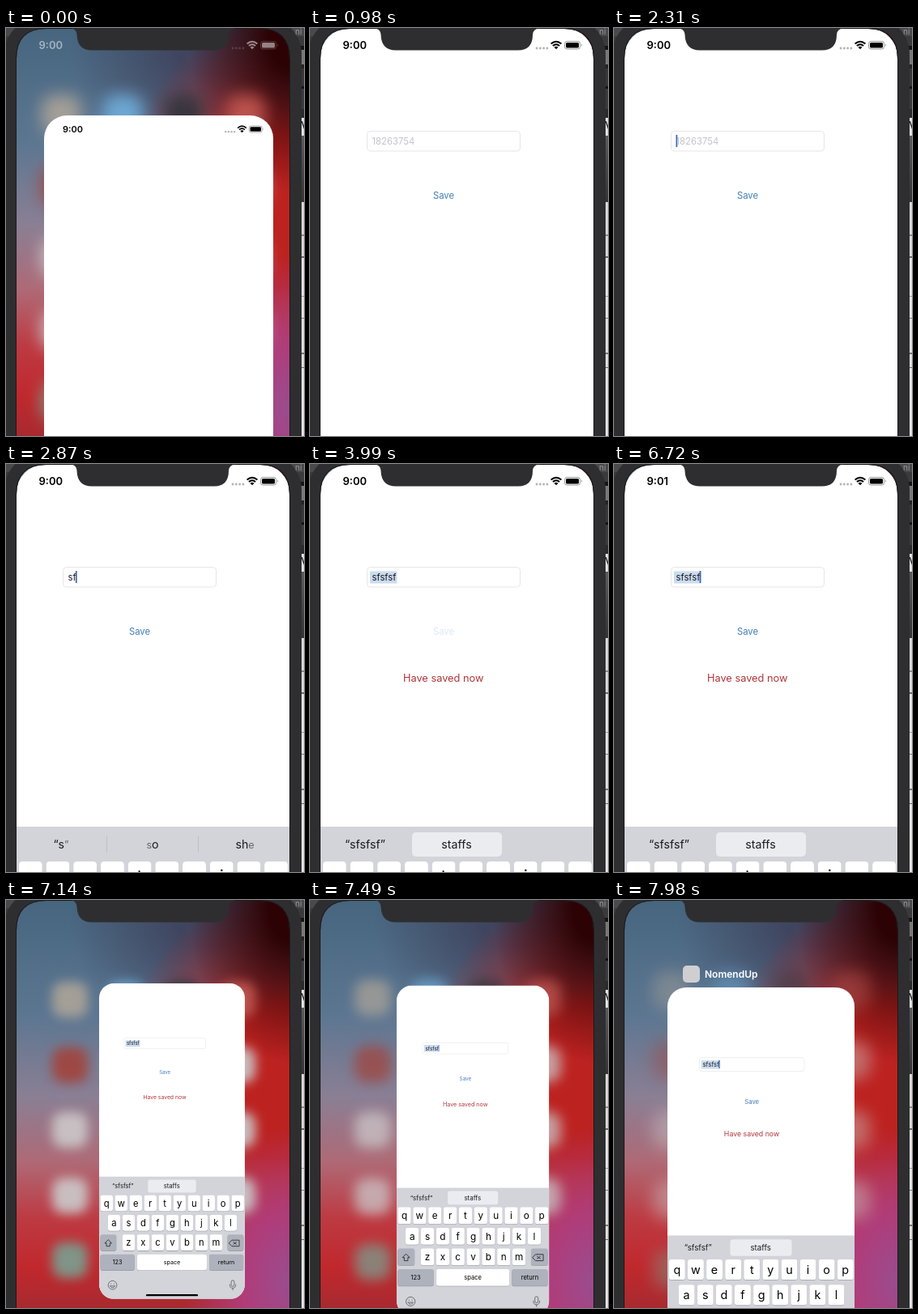
Write an HTML page that moves like this. It is 368x504 px and loops after 8 s.

```html
<!DOCTYPE html>
<html lang="en">
<head>
<meta charset="utf-8">
<style>
html, body { margin: 0; width: 100%; height: 100%; overflow: hidden; }
body {
  position: relative;
  background: linear-gradient(#4a4a4c 0 10px, #3a3a3c 10px 22px, #141414 22px 27px, #777 27px 45px,
    #222 45px 50px, #363638 50px 72px, #111 72px 75px, #3a3a3c 75px 100px, #2a2a2a 100px 111px,
    #e2e2e2 111px 133px, #5a5a5c 133px, #333 215px, #d6d6d6 215px 255px, #888 255px 257px,
    #d6d6d6 257px 282px, #666 282px 284px, #e2e2e2 284px 331px, #999 331px 332px, #e2e2e2 332px 358px,
    #777 358px 359px, #dedede 359px 401px, #777 401px 403px, #dedede 403px 419px, #666 419px 420px, #e2e2e2 420px);
}
#wall {
  position: absolute; left: 13px; top: 1px; width: 337px; height: 503px; overflow: hidden;
  background:
    radial-gradient(125px 190px at 337px 10px, #2c0204 20%, transparent),
    radial-gradient(130px 190px at 337px 470px, #9a4c90, #b03c78 45%, transparent),
    radial-gradient(215px 240px at 337px 225px, #bc2220 40%, transparent),
    radial-gradient(170px 130px at 235px 30px, #40455f 20%, transparent),
    linear-gradient(#46657f, #5c7691 28%, #8a7f94 48%, #ae6a76 64%, #bd3a42 78%, #c0282d 90%, #a82a30);
}
#icons { position: absolute; inset: 0; transform-origin: 174px 284px; }
#icons i { position: absolute; width: 44px; height: 44px; border-radius: 14px; }
svg { position: absolute; left: 0; top: 0; font-family: Inter, Roboto, sans-serif; }
</style>
</head>
<body>
<div id="wall"><div id="icons"></div></div>
<svg width="368" height="504" viewBox="0 0 368 504">
  <defs>
    <clipPath id="round"><rect x="13" y="1" width="337" height="730" rx="34"/></clipPath>
    <g id="signal">
      <g opacity=".3"><circle cx="280" cy="25" r="1.4"/><circle cx="284.3" cy="25" r="1.4"/><circle cx="288.6" cy="25" r="1.4"/><circle cx="292.9" cy="25" r="1.4"/></g>
      <path d="M297.6 19.6Q304 13.8 310.4 19.6M299.9 22.1Q304 18.4 308.1 22.1" fill="none" stroke="currentColor" stroke-width="2"/>
      <path d="M301.5 23.8Q304 21.8 306.5 23.8L304 26.3Z"/>
      <rect x="314.5" y="16.5" width="19" height="9.5" rx="2.8" fill="none" stroke="currentColor" opacity=".4"/>
      <rect x="316" y="18" width="16" height="6.5" rx="1.5"/>
      <path d="M335 19.5Q337 21.2 335 23Z" opacity=".4"/>
    </g>
  </defs>
  <g id="homeStatus" fill="#fff" color="#fff" opacity=".5">
    <text x="40.5" y="26" font-size="13" font-weight="600">9:00</text><use href="#signal"/>
  </g>
  <g id="card">
    <g clip-path="url(#round)">
      <rect x="13" y="1" width="337" height="730" fill="#fff"/>
      <g id="status" color="#000">
        <text id="clock" x="40.5" y="26" font-size="13" font-weight="600">9:00</text><use href="#signal"/>
      </g>
      <g id="form" font-size="11.3">
        <rect x="70.5" y="127.5" width="189" height="24.5" rx="4" fill="#fff" stroke="#e6e6e8"/>
        <rect id="mark" x="74" y="132.5" height="15" fill="#cbdcf0"/>
        <text id="hint" x="76.5" y="144" fill="#c4c4c8">18263754</text>
        <text id="typed" x="76.5" y="144" fill="#1a1a1a"></text>
        <rect id="caret" y="132" width="1.8" height="15" fill="#4268c0"/>
        <text id="save" x="165" y="211" text-anchor="middle" fill="#437fb8">Save</text>
      </g>
      <text id="saved" x="164.7" y="269" text-anchor="middle" font-size="12.8" fill="#b2353a">Have saved now</text>
      <g id="board" text-anchor="middle">
        <rect x="13" y="448" width="337" height="283" fill="#d2d4da"/>
        <path id="lines" d="M124.5 460V480M237.5 460V480" stroke="#bcbfc6"/>
        <rect id="pick" x="126" y="455" width="111" height="30" rx="5" fill="#ebecf0"/>
        <g id="words" font-size="14.2" fill="#1c1c1e"></g>
        <g id="keys"></g>
        <g fill="none" stroke="#55585f" stroke-width="1.5">
          <circle cx="44" cy="699" r="10"/><path d="M38 701Q44 709 50 701ZM40.5 695V697M47.5 695V697"/>
          <rect x="318.5" y="688" width="7" height="14" rx="3.5"/><path d="M315 697Q315 706 322 706T329 697M322 706V711"/>
        </g>
        <g fill="none" stroke="#222" stroke-width="1.5">
          <path d="M34 594L42 602H38V609H30V602H26Z"/>
          <path d="M320 595H337V609H320L313 602ZM323 599L331 605M331 599L323 605"/>
        </g>
        <rect x="121.5" y="720" width="120" height="4.5" rx="2.2"/>
      </g>
    </g>
  </g>
  <g id="title" fill="#fff">
    <rect x="85" y="81" width="21" height="21" rx="5" fill="#cfcfd2"/>
    <text x="112" y="96" font-size="12" font-weight="600">NomendUp</text>
  </g>
  <path fill="#2e2e30" fill-rule="evenodd" d="M-2 504V32A45 45 0 0 1 43 -13H320A45 45 0 0 1 365 32V504ZM13 504V38Q13 1 50 1H313Q350 1 350 38V504Z"/>
  <path d="M12.5 504V38Q12.5 .5 50 .5H313Q350.5 .5 350.5 38V504" fill="none" stroke="#1a1a1c"/>
  <path d="M79 0Q87 1 87.5 8Q88 27.5 106 27.5H257Q275 27.5 275 8Q275.5 1 284 0Z" fill="#2e2e30"/>
  <text x="357" y="8" font-size="10" fill="#999">ni</text>
  <text x="364" y="127" font-size="16" fill="#222">V</text>
</svg>
<script>
const $ = id => document.getElementById(id);
const ramp = (t, a, b) => Math.min(1, Math.max(0, (t - a) / (b - a)));
const smooth = p => p * p * (3 - 2 * p);
const out = p => 1 - (1 - p) ** 3;
const show = (id, v) => $(id).setAttribute("opacity", v);

// Value at time t along [time, value] points
function track(t, points, ease = p => p) {
  let [t0, v0] = points[0];
  for (const [t1, v1] of points) {
    if (t < t1) return v0 + (v1 - v0) * ease(ramp(t, t0, t1));
    [t0, v0] = [t1, v1];
  }
  return v0;
}

const pale = "#cac4c6";
const tones = { 0: "#a8a298", 1: "#6fabd8", 2: "#34353d", 3: "#c05550", 4: "#a04640", 16: "#7d9a8c" };
$("icons").innerHTML = Array.from({ length: 17 }, (_, i) =>
  `<i style="left:${44 + i % 4 * 69}px;top:${100 + (i >> 2) * 80.5}px;background:${tones[i] || pale}"></i>`).join("");

function key(x, row, w, label, size = 21, fill = "#fff") {
  const y = 491 + row * 45.6;
  return `<rect x="${x}" y="${y + 1}" width="${w}" height="37" rx="4.5" fill="#8d9097"/>
    <rect x="${x}" y="${y}" width="${w}" height="37" rx="4.5" fill="${fill}"/>
    <text x="${x + w / 2}" y="${y + (size > 20 ? 26 : 23.5)}" font-size="${size}">${label}</text>`;
}
const rows = ["qwertyuiop", "asdfghjkl", "zxcvbnm"];
const starts = [15.8, 33, 66.7], grey = "#aeb2bc";
$("keys").innerHTML = rows.map((r, i) =>
  [...r].map((c, j) => key(starts[i] + j * 33.7, i, 29, c)).join("")).join("") +
  key(15.8, 2, 37, "", 21, grey) + key(310, 2, 37, "", 21, grey) +
  key(15.8, 3, 79, "123", 13.5, grey) + key(101, 3, 161, "space", 13.5) + key(267.7, 3, 79, "return", 13.5, grey);

const typing = [[2730, "s"], [2870, "sf"], [2940, "sfs"], [3080, "sfsf"], [3150, "sfsfs"], [3430, "sfsfsf"]];
const guesses = [[0, "“”", "", ""], [2730, "“s”", "so", "she"], [3150, "“sfsf”", "", ""], [3430, "“sfsfsf”", "staffs", ""]];
const last = (list, t) => list.filter(e => e[0] <= t).pop();

// One letter of each fresh guess fades and grows in
function drawWords(t) {
  const [from, ...words] = last(guesses, t);
  const p = ramp(t, from - 70, from + 280);
  $("words").innerHTML = words.map((w, i) => {
    const n = i === 1 ? 0 : w.length - 1;
    const letters = [...w].map((c, j) =>
      j === n && p < 1 ? `<tspan fill-opacity="${p}" font-size="${10 + 4.2 * p}">${c}</tspan>` : c);
    return `<text x="${[68, 181, 295][i]}" y="475">${letters.join("")}</text>`;
  }).join("");
}

function drawForm(t) {
  const text = (last(typing, t) || [0, ""])[1];
  $("typed").textContent = text;
  const width = text ? $("typed").getComputedTextLength() : 0;
  $("caret").setAttribute("x", 76.5 + width - (text ? .8 : 0));
  show("caret", track(t, [[2100, 0], [2170, 1], [3710, 1], [3780, 0], [4690, 0], [4970, 1], [5250, 1],
    [5390, 0], [5740, 0], [5880, 1], [6930, 1], [7000, 0], [7420, 0], [7560, 1]]));
  $("mark").setAttribute("width", width + 3.5);
  show("mark", t >= 3780 ? 1 : 0);
  show("hint", text ? 0 : 1);
  show("form", ramp(t, 700, 980));
  show("save", track(t, [[3920, 1], [3990, .18], [4130, .18], [4550, 1]]));
  show("saved", t >= 3990 ? 1 : 0);
  $("clock").textContent = t < 4340 ? "9:00" : "9:01";
}

function drawStage(t) {
  let x, y, s;
  if (t < 6720) {
    const left = 1 - out(ramp(t, 0, 280));
    [x, y, s] = [34 * left, 107 * left, 1 - .16 * left];
  } else {
    const path = (a, b, c, d) => track(t, [[6720, a], [7140, b], [7350, c], [7840, d]], smooth);
    x = path(0, 102, 104, 53);
    y = path(0, 102, 104, 107);
    s = path(1, .534, .528, .6855);
  }
  $("card").setAttribute("transform", `translate(${13 + x} ${1 + y}) scale(${s}) translate(-13 -1)`);
  show("status", 1 - ramp(t, 6720, 6930));
  show("homeStatus", t < 400 ? .5 : 0);
  show("title", ramp(t, 7490, 7840));

  const zoom = track(t, [[6720, 1.1], [7140, 1], [7350, 1], [7840, 1.07]], smooth);
  const haze = track(t, [[6720, 9], [7140, 7], [7350, 7], [7840, 9]]);
  $("icons").style.transform = `scale(${zoom})`;
  $("icons").style.filter = `blur(${haze}px)`;
  $("icons").style.opacity = track(t, [[7140, .95], [7350, .9], [7840, .45]]);
}

function frame(now) {
  const t = Math.floor(now % 8000 / 70) * 70;
  drawStage(t);
  drawForm(t);
  drawWords(t);
  $("board").setAttribute("transform", `translate(0 ${283 * (1 - out(ramp(t, 2240, 2660)))})`);
  show("pick", ramp(t, 3430, 3780));
  show("lines", 1 - ramp(t, 3430, 3780));
  requestAnimationFrame(frame);
}
requestAnimationFrame(frame);
</script>
</body>
</html>
```
